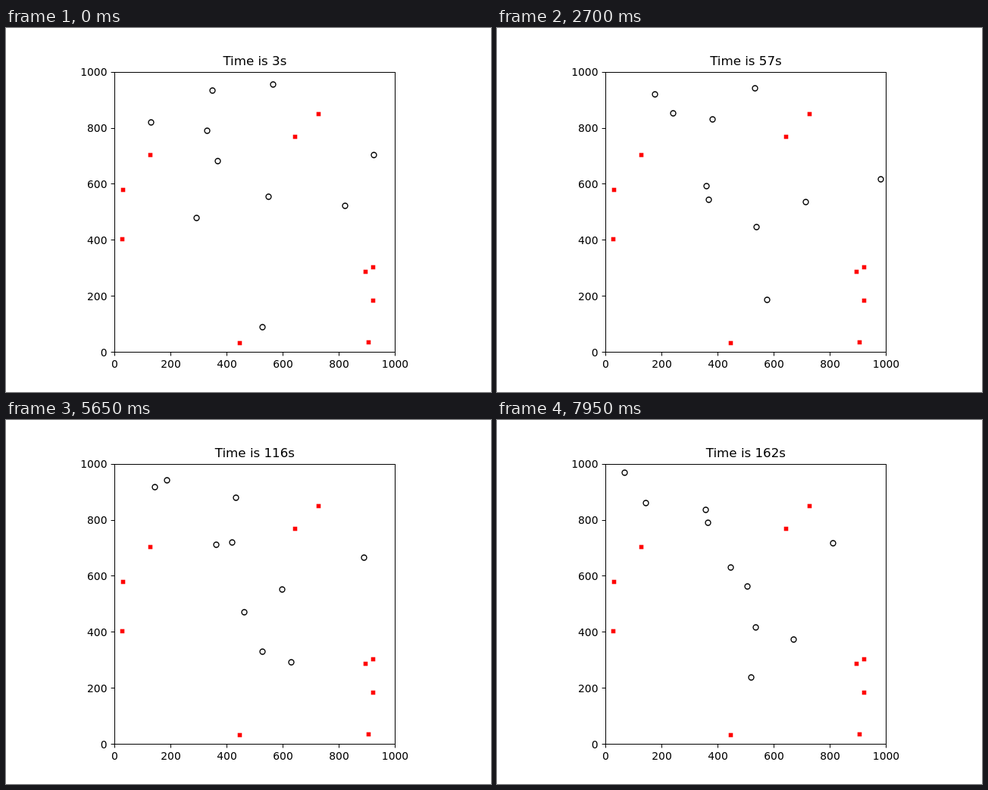
These frames come from a looping animation (640 by 480 pixels, 8000 ms). An HTML page:

```html
<!DOCTYPE html>
<html lang="en">
<head>
<meta charset="utf-8">
<title>Moving nodes</title>
<style>
  html, body { margin: 0; width: 100%; height: 100%; overflow: hidden; background: #fff; }
  svg { display: block; width: 640px; height: 480px; }
  text { font: 13.89px "DejaVu Sans", sans-serif; fill: #000; text-anchor: middle; }
  #title { font-size: 16.67px; }
  .yLabel { text-anchor: end; }
  .axis { fill: none; stroke: #000; }
  .node { fill: none; stroke: #000; stroke-width: 1.39; }
  .station { fill: #f00; }
</style>
</head>
<body>
<svg id="plot" viewBox="0 0 640 480">
  <rect class="axis" x="143.5" y="58.5" width="370" height="369"/>
  <text id="title" x="328.4" y="49"></text>
</svg>
<script>
const STEP_MS = 50, STEPS = 160, FIRST_SECOND = 3;
const LEFT = 143.2, BOTTOM = 427.2, TICK_GAP = 73.92;
const SPEED = 2 * TICK_GAP / 200;   // two plot units per step

const plot = document.getElementById('plot');
const title = document.getElementById('title');
const snap = v => Math.floor(v) + 0.5;

function add(tag, attrs, text = '') {
  const el = document.createElementNS('http://www.w3.org/2000/svg', tag);
  for (const key in attrs) el.setAttribute(key, attrs[key]);
  el.textContent = text;
  return plot.appendChild(el);
}

for (let i = 0; i <= 5; i++) {
  const x = snap(LEFT + i * TICK_GAP + 0.5), y = BOTTOM - i * TICK_GAP;
  add('path', { class: 'axis', d: `M${x} 428v4.4M143 ${snap(y + 0.5)}h-4.4` });
  add('text', { x, y: 448 }, i * 200);
  add('text', { class: 'yLabel', x: 133.5, y: Math.round(y + 5.4) }, i * 200);
}

const stations = [
  [154, 213], [153, 278], [190, 167], [381, 143], [412, 113],
  [474, 321], [484, 315], [484, 359], [478, 414], [308, 415]
];
const SIZE = 5.56;
for (const [x, y] of stations)
  add('rect', { class: 'station', x: snap(x) - SIZE / 2, y: snap(y) - SIZE / 2, width: SIZE, height: SIZE });

// A node walks at constant speed; each turn is [step, new heading in degrees].
function node(x, y, heading, ...turns) {
  const legs = [[0, heading], ...turns];
  const circle = add('circle', { class: 'node', r: 3.47 });
  return step => {
    let px = x, py = y;
    legs.forEach(([from, angle], i) => {
      const to = i + 1 < legs.length ? legs[i + 1][0] : STEPS;
      const distance = SPEED * Math.max(0, Math.min(step, to) - from);
      px += distance * Math.cos(angle * Math.PI / 180);
      py += distance * Math.sin(angle * Math.PI / 180);
    });
    circle.setAttribute('cx', snap(px));
    circle.setAttribute('cy', snap(py));
  };
}

const nodes = [
  node(272.8, 82.2, 72.4),
  node(265.6, 135.2, 214.15),
  node(346.4, 222.4, 95.4),
  node(447.4, 234.25, 187.3),
  node(338.4, 394.4, -63.2),
  node(191.95, 124, -64.8, [89.9, 117.2]),
  node(251.55, 250, -46.3, [48.2, 37.1]),
  node(279.1, 175.4, 94.3, [49.2, 271], [155.5, 80]),
  node(352.36, 74.64, -44.3, [18.7, 147.3], [156.7, 240]),
  node(485.25, 167.2, 53, [49.5, 108.8], [59.6, 213.9])
];

const start = performance.now();
let shown = -1;
function tick() {
  const step = Math.floor((performance.now() - start) / STEP_MS) % STEPS;
  if (step !== shown) {
    shown = step;
    title.textContent = `Time is ${FIRST_SECOND + step}s`;
    nodes.forEach(moveTo => moveTo(step));
  }
  requestAnimationFrame(tick);
}
tick();
</script>
</body>
</html>
```
